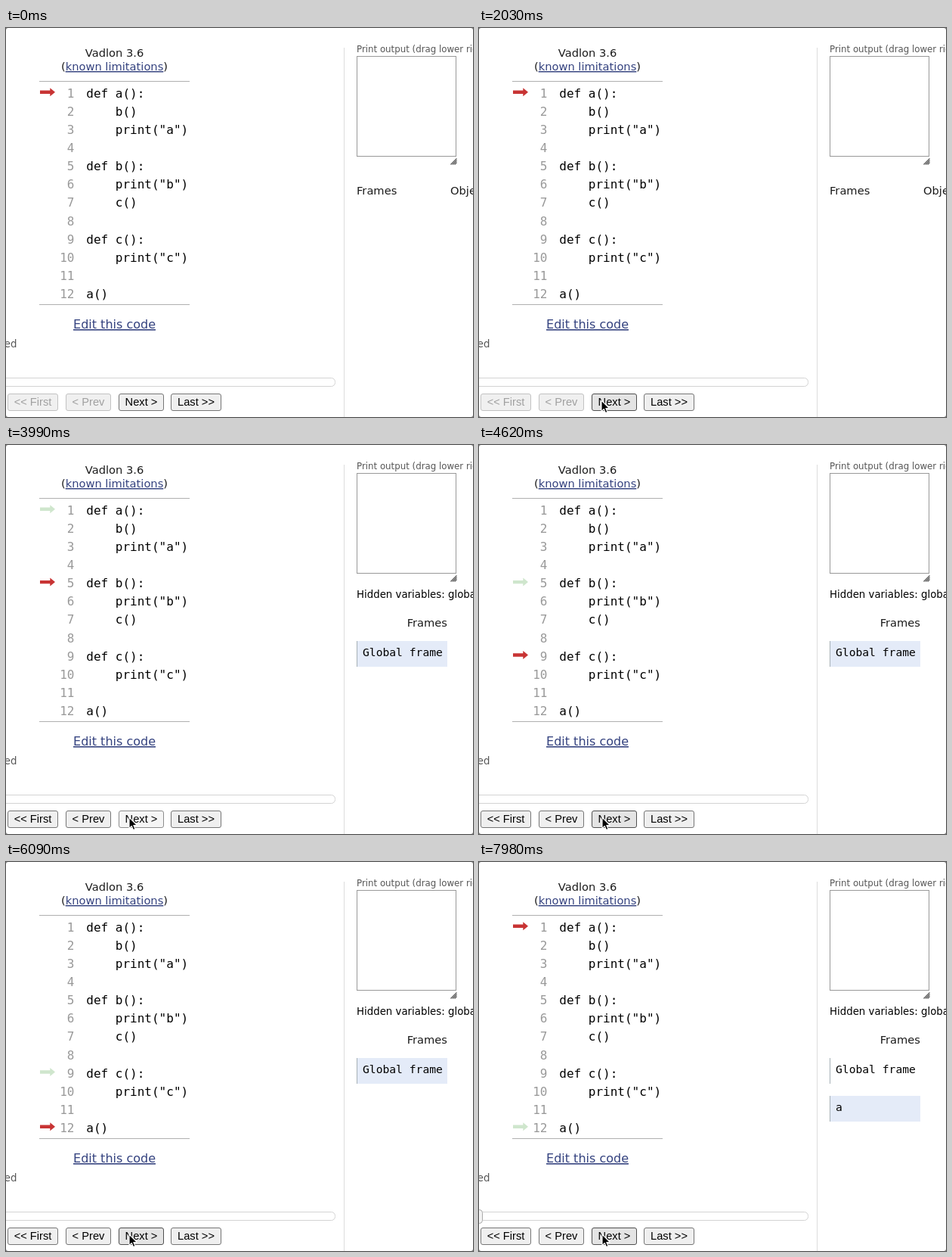
An HTML page that plays this animation: 618 by 514 pixels, repeating every 8000 ms.

```html
<!DOCTYPE html>
<html lang="en">
<head>
<meta charset="utf-8">
<title>Code stepper</title>
<style>
  html, body { margin: 0; width: 100%; height: 100%; overflow: hidden; background: #777; }
  svg { display: block; width: 618px; height: 514px; }
  text { font-family: "DejaVu Sans", Verdana, sans-serif; font-size: 14.67px; fill: #1c1c1c; white-space: pre; }
  .mono { font-family: "DejaVu Sans Mono", monospace; fill: #000; }
  .code { font-size: 16px; }
  .num { fill: #999; text-anchor: end; }
  .link { fill: #34427f; text-decoration: underline; text-decoration-thickness: 1px; }
  .btn text { font-family: "Liberation Sans", Arial, sans-serif; fill: inherit; text-anchor: middle; }
</style>
</head>
<body>
<svg id="stage" viewBox="0 0 618 514">
  <rect width="618" height="514" rx="3" fill="#fff"/>

  <text x="143.5" y="38" text-anchor="middle">Vadlon 3.6</text>
  <text x="143.5" y="56" text-anchor="middle">(<tspan class="link">known limitations</tspan>)</text>
  <path d="M44 70.5H243M44 365.5H243" stroke="#b0b0b0"/>
  <g id="code"></g>
  <polygon id="prev" points="0,3.3 13.3,3.3 13.3,0 20,5.5 13.3,11 13.3,7.7 0,7.7"/>
  <polygon id="cur" points="0,3.3 13.3,3.3 13.3,0 20,5.5 13.3,11 13.3,7.7 0,7.7" fill="#c83434"/>
  <text class="link" x="143.5" y="397" text-anchor="middle" style="font-size:16px">Edit this code</text>
  <text x="14.5" y="422" text-anchor="end" style="font-size:13.33px;fill:#555">ed</text>

  <rect x="-20" y="462.5" width="455.5" height="11" rx="5" fill="#fff" stroke="#d3d3d3"/>
  <rect id="knob" x="-15.5" y="459.5" width="20" height="18" rx="4" fill="#f4f4f4" stroke="#aaa"/>
  <g id="buttons"></g>

  <path d="M447.5 26V514" stroke="#ddd"/>
  <text x="464" y="32" style="font-size:11.8px;fill:#555">Print output (drag lower right corner to resize)</text>
  <rect x="464.5" y="37.5" width="131" height="132" fill="#fff" stroke="#999"/>
  <path d="M588.5 180.5L596.5 172.5M591 180.5L596.5 175M593.5 180.5L596.5 177.5" stroke="#666" stroke-width="1.5"/>

  <g id="empty">
    <text x="464" y="220">Frames</text>
    <text x="588" y="220">Objects</text>
  </g>
  <g id="running">
    <text x="464" y="202" style="font-size:13.33px;fill:#000">Hidden variables: global</text>
    <text x="584" y="240" text-anchor="end">Frames</text>
    <rect id="globalBox" x="464" y="259" width="120" height="34"/>
    <path d="M464.5 259V293" stroke="#a6b0b6"/>
    <text class="mono" x="472" y="279">Global frame</text>
  </g>
  <g id="call">
    <rect x="464" y="309" width="120" height="34" fill="#e4ebf8"/>
    <path d="M464.5 309V343" stroke="#a6b0b6"/>
    <text class="mono" x="472" y="329">a</text>
  </g>

  <path id="pointer" d="M0 0V14.6L3.3 11.5L5.5 16.6L8 15.5L5.8 10.5H10.4Z" fill="#000" stroke="#fff" stroke-width="1.1" stroke-linejoin="round"/>
</svg>
<script>
const LOOP = 8000, PITCH = 24.1, FADE = 200, SLIDE = 250;
const lines = ['def a():', '    b()', '    print("a")', '', 'def b():', '    print("b")',
  '    c()', '', 'def c():', '    print("c")', '', 'a()'];

// button: label, left, width
const buttonSpecs = [['<< First', 2, 67], ['< Prev', 79, 60], ['Next >', 149, 60], ['Last >>', 218, 67]];

// step: press time, click time, line before, line after
const steps = [[2060, 2170, 1, 5], [3985, 4125, 5, 9], [5385, 5580, 9, 12], [7060, 7205, 12, 1]];

// pointer: time, x, y
const path = [[400, 74, 518], [800, 92, 502], [1120, 106, 494], [1190, 108, 493], [1470, 114, 494],
  [1560, 115, 494], [1610, 130, 493], [1860, 130, 493], [2020, 162, 492], [2670, 162, 492], [2730, 163, 492]];

// button looks: fill, stroke, text
const looks = {
  normal: ['#efefef', '#767676', '#000'],
  hover: ['#e4e4e4', '#4f4f4f', '#000'],
  active: ['#f5f5f5', '#8d8d8d', '#000'],
  disabled: ['#f0f0f0', '#c2c2c2', '#a0a0a0']
};

const $ = id => document.getElementById(id);
const clamp = v => Math.max(0, Math.min(1, v));
const ease = v => v < .5 ? 4 * v ** 3 : 1 - 4 * (1 - v) ** 3;
const show = (id, on) => { $(id).style.display = on ? '' : 'none'; };

function add(parent, tag, attrs, text) {
  const el = document.createElementNS('http://www.w3.org/2000/svg', tag);
  for (const key in attrs) el.setAttribute(key, attrs[key]);
  if (text) el.textContent = text;
  parent.appendChild(el);
  return el;
}

lines.forEach((line, i) => {
  const y = Math.round(91.8 + i * PITCH), indent = line.length - line.trimStart().length;
  add($('code'), 'text', { class: 'mono code num', x: 90.5, y }, String(i + 1));
  if (line) add($('code'), 'text', { class: 'mono code', x: 106.3 + indent * 9.632, y }, line.trim());
});

const buttons = buttonSpecs.map(([label, x, w]) => {
  const g = add($('buttons'), 'g', { class: 'btn' });
  const box = add(g, 'rect', { x: x + .5, y: 483.5, width: w - 1, height: 22, rx: 2.5 });
  add(g, 'text', { x: x + w / 2, y: 499 }, label);
  return { g, box };
});

function paint({ g, box }, look) {
  const [fill, stroke, ink] = looks[look];
  box.setAttribute('fill', fill);
  box.setAttribute('stroke', stroke);
  g.style.fill = ink;
}

function placeArrow(id, line) {
  $(id).setAttribute('transform', `translate(45 ${79.2 + (line - 1) * PITCH})`);
}

function pointerAt(t) {
  let i = 0;
  while (i < path.length - 2 && t > path[i + 1][0]) i++;
  const [t0, x0, y0] = path[i], [t1, x1, y1] = path[i + 1];
  const p = clamp((t - t0) / (t1 - t0));
  return [x0 + (x1 - x0) * p, y0 + (y1 - y0) * p];
}

function drawArrows(t) {
  const n = steps.filter(s => t >= s[1]).length;
  if (!n) {
    show('prev', false);
    placeArrow('cur', 1);
    return;
  }
  const [, click, from, to] = steps[n - 1];
  const age = t - click, fading = age < FADE;
  placeArrow('cur', from + (to - from) * ease(clamp((age - FADE) / SLIDE)));
  show('prev', !fading || n > 1);
  placeArrow('prev', fading && n > 1 ? steps[n - 2][2] : from);
  $('prev').setAttribute('fill', '#cfe6cd');
  $('prev').setAttribute('opacity', fading ? 1 - ease(age / FADE) : 1);
}

function draw(t) {
  const started = t >= steps[0][1], called = t >= steps[3][1];
  show('empty', !started);
  show('running', started);
  show('call', called);
  show('knob', called);
  $('globalBox').setAttribute('fill', called ? '#fff' : '#e4ebf8');

  const [x, y] = pointerAt(t);
  show('pointer', t >= path[0][0]);
  $('pointer').setAttribute('transform', `translate(${x} ${y})`);

  const pressed = steps.some(([down, up]) => t >= down && t < up);
  paint(buttons[0], started ? 'normal' : 'disabled');
  paint(buttons[1], started ? 'normal' : 'disabled');
  paint(buttons[2], pressed ? 'active' : x >= 149 ? 'hover' : 'normal');
  paint(buttons[3], 'normal');
  drawArrows(t);
}

const begin = performance.now();
function tick() {
  draw((performance.now() - begin) % LOOP);
  requestAnimationFrame(tick);
}
draw(0);
requestAnimationFrame(tick);
</script>
</body>
</html>
```
